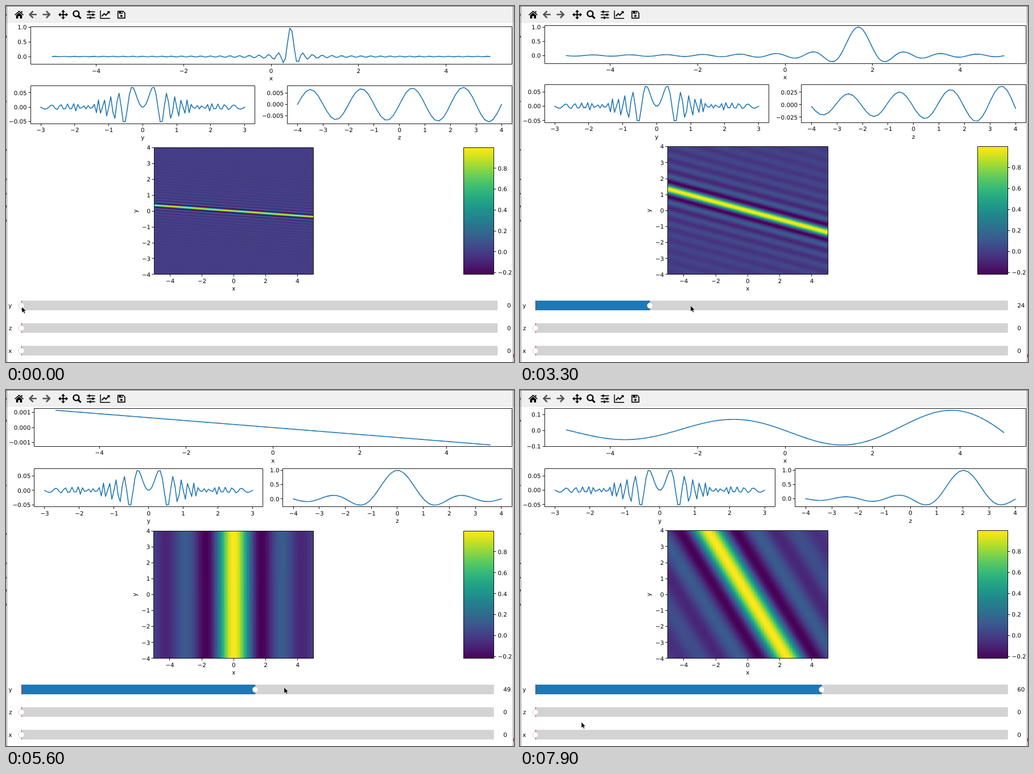
Write an HTML page with a canvas that moves like this. It is 893 by 627 pixels and loops after 8 s.

```html
<!DOCTYPE html>
<html lang="en">
<head>
<meta charset="utf-8">
<title>Slice viewer</title>
<style>
html, body { margin: 0; width: 100%; height: 100%; overflow: hidden; background: #fff; }
#stage { position: relative; width: 893px; height: 627px; overflow: hidden; }
#heat, svg { position: absolute; left: 0; top: 0; }
text { font: 10.3px "DejaVu Sans", sans-serif; text-rendering: geometricPrecision; fill: #000; }
.end { text-anchor: end; }
.mid { text-anchor: middle; }
.axis { fill: none; stroke: #000; stroke-width: .9; }
.curve { fill: none; stroke: #1f77b4; stroke-width: 1.6; stroke-linejoin: round; stroke-linecap: square; }
.ink { fill: none; stroke: #000; stroke-width: 2; }
</style>
</head>
<body>
<div id="stage">
  <canvas id="heat"></canvas>
  <svg width="893" height="627" viewBox="0 0 893 627">
    <defs><linearGradient id="scale" x1="0" y1="1" x2="0" y2="0"></linearGradient></defs>
    <g id="window">
      <rect width="893" height="29" fill="#f0f0f0"/>
      <path d="M0 28.5H893" stroke="#e2e2e2"/>
      <path d="M0 .5H893M1.5 0V627M891.5 0V627" stroke="#777" fill="none"/>
      <path d="M.5 14v3M.5 52v4M.5 167v2M.5 252v3M.5 304v3M.5 329v3M.5 351v4M.5 376v4" stroke="#456"/>
      <path d="M892.5 613v6" stroke="#c33"/>
      <path d="M4.5 8V23" stroke="#b8b8b8" stroke-dasharray="1 2"/>
      <path d="M15 15.4 23 8.2 31 15.4 30 16.6 23 10.4 16 16.6ZM17.8 16.2 23 11.7 28.2 16.2V22H24.6V17.8H21.4V22H17.8ZM26.4 9H28.6V12.5L26.4 10.6Z"/>
      <g id="arrow" fill="none" stroke="#555" stroke-width="2.6"><path d="M47.6 9 41.6 15 47.6 21M42 15H54"/></g>
      <use href="#arrow" transform="translate(118.4) scale(-1 1)"/>
      <path class="ink" d="M100.5 9V21.5M94 15.2H107"/>
      <path d="M100.5 6.8 104 10.6H97ZM100.5 23.6 104 19.8H97ZM92 15.2 95.8 11.7V18.7ZM109 15.2 105.2 11.7V18.7Z"/>
      <circle class="ink" cx="123.4" cy="13.6" r="5" style="stroke-width:2.4"/>
      <path class="ink" d="M127 17.4 131.6 22" style="stroke-width:3"/>
      <path class="ink" d="M142 10.2H156.5M142 15.4H156.5M142 20.6H156.5" style="stroke-width:1.6"/>
      <path d="M145 8h2.6v4.4H145zM151.6 13.2h2.6v4.4h-2.6zM147 18.4h2.6v4.4H147z"/>
      <path class="ink" d="M166 8V21.8H183" style="stroke-width:1.5"/>
      <path class="ink" d="M168.5 18 172.6 13.6 175.4 16.2 180.4 11"/>
      <path d="M177.6 9H182.4V13.8Z"/>
      <path class="ink" d="M196.7 9.2H206L209 12.2V21.4H196.7Z" style="stroke-width:1.6;stroke-linejoin:round"/>
      <path d="M198.6 9h6.4v4.6h-6.4z"/><circle cx="202.8" cy="17.6" r="2"/>
      <path d="M202.4 10h1.6v2.4h-1.6z" fill="#f0f0f0"/>
    </g>
    <g id="plots"></g>
    <path id="cursor" d="M0 0V10L2.4 7.9 4 11.5 5.6 10.8 4 7.3H7Z" stroke="#fff" stroke-width=".4"/>
  </svg>
</div>
<script>
const $ = id => document.getElementById(id);
const EM = 10.3, RIGHT = 889, LOOP = 8000, LOW = -0.2172, HIGH = 0.9985;

// [ms, slider value] and [ms, x, y]
const VALUE = [[0, 0], [400, 0], [900, 2], [1500, 2], [2400, 16], [2700, 16], [4000, 34],
  [4900, 44], [5000, 44], [6300, 55], [6500, 55], [7000, 60], [8000, 60]];
const MOUSE = [[0, 28, 530], [300, 28, 530], [700, 56, 527], [800, 56, 527], [1000, 72, 526],
  [1100, 72, 526], [1500, 97, 525], [2400, 225, 524], [2700, 225, 524], [4000, 387, 533],
  [4900, 451, 533], [5000, 451, 533], [6300, 533, 514], [6500, 533, 514], [7400, 311, 557],
  [7900, 108, 585], [8000, 108, 585]];

const VIRIDIS = [
  [0.27773, 0.00541, 0.3341], [0.10509, 1.40461, 1.38459], [-0.33086, 0.21485, 0.0951],
  [-4.63423, -5.7991, -19.33244], [6.22827, 14.17993, 56.69055],
  [4.77638, -13.74515, -65.35303], [-5.43546, 4.64585, 26.31244]];

function viridis(t) {
  return [0, 1, 2].map(k => 255 * VIRIDIS.reduceRight((sum, c) => sum * t + c[k], 0));
}
const palette = Array.from({ length: 256 }, (_, i) => viridis(i / 255));

const sinc = v => Math.abs(v) < 1e-9 ? 1 : Math.sin(Math.PI * v) / (Math.PI * v);
const field = (x, y, z) => sinc(x * y * y + z);
const linspace = (r, n) => Array.from({ length: n }, (_, i) => -r + 2 * r * i / (n - 1));
const XS = linspace(5, 200), YS = linspace(3, 100), ZS = linspace(4, 50);
const snap = v => Math.floor(v) + 0.5;

function at(keys, t) {
  let i = 1;
  while (i < keys.length - 1 && keys[i][0] < t) i++;
  const a = keys[i - 1], b = keys[i], p = (t - a[0]) / (b[0] - a[0]);
  return a.slice(1).map((v, k) => v + (b[k + 1] - v) * p);
}

const label = (v, digits) => (v < -1e-9 ? "\u2212" : "") + Math.abs(v).toFixed(digits);
const textWidth = s => EM * [...s].reduce((w, c) => w + (c === "." ? 0.318 : c === "\u2212" ? 0.838 : 0.636), 0);
const text = (x, y, s, cls = "") => `<text x="${x}" y="${y + 3.75}" class="${cls}">${s}</text>`;

// Largest round step that still leaves two ticks
function ticksFor(min, max) {
  const raw = (max - min) / 3, base = Math.floor(Math.log10(raw));
  const steps = [];
  for (let e = base - 1; e <= base + 1; e++)
    for (const m of [1, 2, 2.5, 5]) steps.push([m * 10 ** e, Math.max(0, (m === 2.5 ? 1 : 0) - e)]);
  let i = steps.findIndex(s => s[0] >= raw * (1 - 1e-9));
  for (; i >= 0; i--) {
    const [step, digits] = steps[i], list = [];
    for (let n = Math.ceil(min / step); n * step <= max; n++) list.push([n * step, label(n * step, digits)]);
    if (list.length > 1) return list;
  }
  return [];
}

function makePlot(xs, fn) {
  const ys = xs.map(fn), lo = Math.min(...ys), hi = Math.max(...ys), pad = (hi - lo) * 0.05;
  const p = { xs, ys, min: lo - pad, max: hi + pad };
  p.ticks = ticksFor(p.min, p.max);
  p.wide = Math.max(...p.ticks.map(t => textWidth(t[1])));
  p.over = Math.max(0, 4.4 - (p.max - p.ticks[p.ticks.length - 1][0]) / (p.max - p.min) * 67);
  return p;
}

function frame(l, t, r, b) {
  return `<path class="axis" d="M${snap(l)} ${snap(t)}H${snap(r)}V${snap(b)}H${snap(l)}Z"/>`;
}
function xTicks(list, px, b) {
  return list.map(v => `<path class="axis" d="M${snap(px(v))} ${snap(b)}v4"/>` +
    text(px(v), b + 11, label(v, 0), "mid")).join("");
}
function yTicks(list, py, l) {
  return list.map(([v, s]) => `<path class="axis" d="M${snap(l)} ${snap(py(v))}h-4"/>` +
    text(l - 6.5, py(v), s, "end")).join("");
}

function drawPlot(p, l, t, r, b, name, marks) {
  const span = p.xs[p.xs.length - 1] * 1.1;
  const px = v => (l + r) / 2 + v / span * (r - l) / 2;
  const py = v => b - (v - p.min) / (p.max - p.min) * (b - t);
  const d = p.xs.map((x, i) => px(x).toFixed(2) + " " + py(p.ys[i]).toFixed(2)).join("L");
  return `<path class="curve" d="M${d}"/>` + frame(l, t, r, b) + xTicks(marks, px, b) +
    yTicks(p.ticks, py, l) + text((l + r) / 2, b + 24.5, name, "mid");
}

function drawSlider(name, y, value, end) {
  const l = 27.2, w = end - l, x = l + w * value / 99;
  return `<rect x="${l}" y="${y - 8.5}" width="${w}" height="17" fill="#d3d3d3"/>` +
    `<rect x="${l}" y="${y - 8.5}" width="${x - l}" height="17" fill="#1f77b4"/>` +
    `<path d="M27.5 ${y - 8.5}v17" stroke="#d22"/>` +
    `<circle cx="${x}" cy="${y + 0.3}" r="5" fill="#fff" stroke="#bfbfbf" stroke-width=".8"/>` +
    text(l - w * 0.02, y, name, "end") + text(end + w * 0.02, y, value);
}

// Cosine blend between neighbouring samples
function blend(size, n) {
  return Array.from({ length: size }, (_, i) => {
    const u = Math.min(n - 1, Math.max(0, (i + 0.5) / size * n - 0.5));
    const a = Math.min(n - 2, Math.floor(u));
    return [a, 0.5 - 0.5 * Math.cos(Math.PI * (u - a))];
  });
}

function drawHeat(y, l, t, w, h) {
  const c = $("heat"), W = Math.round(w), H = Math.round(h);
  c.width = W;
  c.height = H;
  c.style.left = Math.round(l) + "px";
  c.style.top = Math.round(t) + "px";
  const grid = XS.map(x => ZS.map(z => field(x, y, z)));
  const cols = blend(W, ZS.length), rows = blend(H, XS.length);
  const g = c.getContext("2d"), img = g.createImageData(W, H);
  let k = 0;
  for (let j = 0; j < H; j++) {
    const [r, q] = rows[H - 1 - j], A = grid[r], B = grid[r + 1];
    for (let i = 0; i < W; i++) {
      const [a, p] = cols[i];
      const top = A[a] + (A[a + 1] - A[a]) * p, low = B[a] + (B[a + 1] - B[a]) * p;
      const v = (top + (low - top) * q - LOW) / (HIGH - LOW);
      const rgb = palette[Math.max(0, Math.min(255, Math.floor(v * 256)))];
      img.data[k++] = rgb[0];
      img.data[k++] = rgb[1];
      img.data[k++] = rgb[2];
      img.data[k++] = 255;
    }
  }
  g.putImageData(img, 0, 0);
}

function draw(value) {
  const y = YS[value];
  const px = makePlot(XS, x => field(x, y, -4));
  const py = makePlot(YS, v => field(-5, v, -4));
  const pz = makePlot(ZS, z => field(-5, y, z));

  // Labels that stick out above a plot push the rows down
  const over2 = Math.max(py.over, pz.over), h = 67.2 - 0.1 * (px.over + over2);
  const t1 = 32.7 + px.over, t2 = t1 + h + 37.3 + over2, b2 = t2 + h;
  const left = 11.6 + Math.max(px.wide, py.wide);
  const w = (RIGHT - left - pz.wide - 18.9) / 2;
  let out = drawPlot(px, left, t1, RIGHT, t1 + h, "x", [-4, -2, 0, 2, 4]) +
    drawPlot(py, left, t2, left + w, b2, "y", [-3, -2, -1, 0, 1, 2, 3]) +
    drawPlot(pz, RIGHT - w, t2, RIGHT, b2, "z", [-4, -3, -2, -1, 0, 1, 2, 3, 4]);

  const mid = 400.4, bottom = 472.9, top = b2 + 42.2, hh = bottom - top, hw = hh * 1.25, hl = mid - hw / 2;
  drawHeat(y, hl, top, hw, hh);
  const levels = [-4, -3, -2, -1, 0, 1, 2, 3, 4].map(v => [v, label(v, 0)]);
  out += frame(hl, top, hl + hw, bottom) +
    xTicks([-4, -2, 0, 2, 4], v => mid + v * hw / 10, bottom) +
    yTicks(levels, v => bottom - (v + 4) / 8 * hh, hl) + text(mid, bottom + 24.5, "x", "mid") +
    `<text class="mid" transform="translate(${hl - 29.5} ${top + hh / 2}) rotate(-90)">y</text>`;

  out += `<rect x="804" y="${top}" width="53.5" height="${hh}" fill="url(#scale)"/>` + frame(804, top, 857, bottom);
  for (let i = -1; i < 5; i++) {
    const v = i / 5, ty = bottom - (v - LOW) / (HIGH - LOW) * hh;
    out += `<path class="axis" d="M857.5 ${snap(ty)}h4"/>` + text(864.5, ty, label(v, 1));
  }

  const end = value > 9 ? 857.7 : 864.2;
  out += drawSlider("y", 527.4, value, end) + drawSlider("z", 567.2, 0, end) + drawSlider("x", 607, 0, end);
  $("plots").innerHTML = out;
}

$("scale").innerHTML = Array.from({ length: 33 }, (_, i) =>
  `<stop offset="${i / 32}" stop-color="rgb(${viridis(i / 32).map(Math.round)})"/>`).join("");

let shown = -1;
function tick() {
  const t = Math.floor(performance.now() % LOOP / 100) * 100;
  const value = Math.round(at(VALUE, t)[0]);
  if (value !== shown) draw(shown = value);
  const [x, y] = at(MOUSE, t);
  $("cursor").setAttribute("transform", `translate(${Math.round(x)} ${Math.round(y)})`);
  requestAnimationFrame(tick);
}
tick();
</script>
</body>
</html>
```
